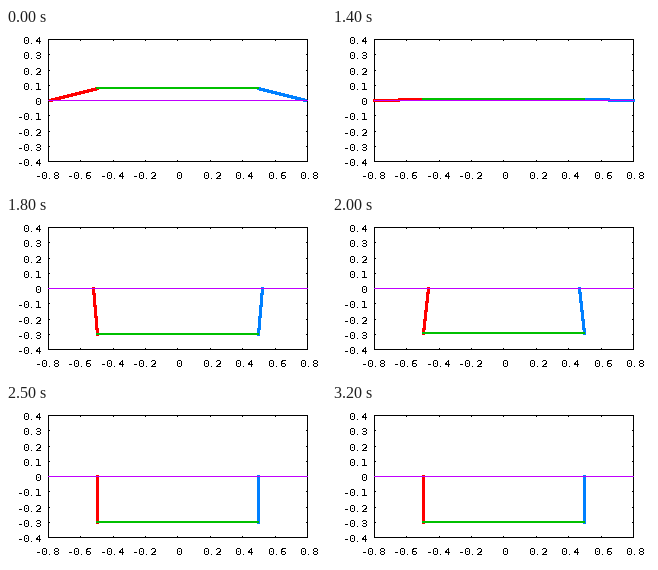
Recreate the animation shown at these times as a matplotlib script. Size 320 by 160 pixels, loop 6000 ms.

```python
import math

import matplotlib.pyplot as plt
import numpy as np
from matplotlib.animation import FuncAnimation

WIDTH, HEIGHT, DPI = 320, 160, 100
FRAMES, STEP_MS = 60, 100
LEFT, RIGHT, TOP, BOTTOM = 42, 301, 11, 133
X_ZERO, Y_ZERO = 171.49, 72
X_SCALE, Y_SCALE = 161.92, 152.5
TICK = 2          # tick length including the border pixel
PITCH = 6         # width of one label character

BLACK, RED, GREEN = (0, 0, 0), (255, 0, 0), (0, 192, 0)
BLUE, PURPLE = (0, 128, 255), (192, 0, 255)

LINK = 0.3        # length of each side link
HALF_BAR = 0.5    # half the length of the bar
START_Y = 0.08

plt.rcParams.update({
    "font.family": "DejaVu Sans Mono",
    "text.antialiased": False,
    "text.hinting": "native",
    "text.hinting_factor": 1,
})


def to_pixel(x, y):
    return (math.floor(X_ZERO + X_SCALE * x + 0.5),
            math.floor(Y_ZERO - Y_SCALE * y + 0.5))


def pose(frame):
    """Return the slider's offset from the bar end and the bar's height."""
    if frame < 17:
        fall = 5.0 * (math.cosh(0.62 * max(frame - 11, 0)) - 1) / Y_SCALE
        y = START_Y - fall
        return math.sqrt(LINK**2 - y**2), y
    # Damped swing around the hanging position
    t = frame * STEP_MS / 1000 - 1.834
    offset = -0.0593 * math.exp(-3.6 * t) * math.sin(9.434 * t)
    return offset, -math.sqrt(LINK**2 - offset**2)


def stroke(img, start, end, color, size=1):
    """Sweep a square brush along a Bresenham line."""
    dx, dy = end[0] - start[0], end[1] - start[1]
    major = 0 if abs(dx) >= abs(dy) else 1
    (x0, y0), (x1, y1) = sorted((start, end), key=lambda p: p[major])
    count = max(abs(dx), abs(dy))

    def along(a, b, i):
        return a + int(math.copysign(abs(b - a) * i / count + 0.5, b - a))

    for i in range(count + 1):
        left = along(x0, x1, i) - size // 2
        top = along(y0, y1, i) - size // 2
        img[top:top + size, left:left + size] = color


def make_background():
    img = np.full((HEIGHT, WIDTH, 3), 255, np.uint8)
    for i in range(-4, 5):
        x, y = to_pixel(i / 5, i / 10)
        img[TOP:TOP + TICK, x] = BLACK
        img[BOTTOM + 1 - TICK:BOTTOM + 1, x] = BLACK
        img[y, LEFT:LEFT + TICK] = BLACK
        img[y, RIGHT + 1 - TICK:RIGHT + 1] = BLACK
    img[[TOP, BOTTOM], LEFT:RIGHT + 1] = BLACK
    img[TOP:BOTTOM + 1, [LEFT, RIGHT]] = BLACK
    return img


def add_labels(ax):
    def label(x, y, text):
        ax.text(x, y, text, fontsize=7.2, color="black",
                ha="left", va="baseline")

    for i in range(-4, 5):
        x, y = to_pixel(i / 5, i / 10)
        y_text, x_text = f"{i / 10:g}", f"{i / 5:g}"
        label(35 - PITCH * len(y_text), y + 5, y_text)
        # Non-negative numbers are centred together with a blank sign column
        blank = 0 if i < 0 else 1
        columns = len(x_text) + blank
        label(x - 1 + PITCH * (blank - columns / 2), 151, x_text)


def render(frame):
    img = background.copy()
    offset, y = pose(frame)
    slider = HALF_BAR + offset
    bar_left, bar_right = to_pixel(-HALF_BAR, y), to_pixel(HALF_BAR, y)
    stroke(img, to_pixel(-slider, 0), bar_left, RED, 3)
    stroke(img, to_pixel(slider, 0), bar_right, BLUE, 3)
    stroke(img, bar_left, bar_right, GREEN, 2)
    stroke(img, (LEFT, Y_ZERO), (RIGHT, Y_ZERO), PURPLE)
    return img


def update(frame):
    picture.set_data(render(frame))
    return (picture,)


background = make_background()
fig = plt.figure(figsize=(WIDTH / DPI, HEIGHT / DPI), dpi=DPI,
                 facecolor="white")
ax = fig.add_axes([0, 0, 1, 1])
ax.axis("off")
picture = ax.imshow(render(0), extent=(0, WIDTH, HEIGHT, 0),
                    interpolation="nearest", aspect="auto")
add_labels(ax)

anim = FuncAnimation(fig, update, frames=FRAMES, interval=STEP_MS,
                     repeat=True, repeat_delay=0, blit=False)
plt.show()
```
